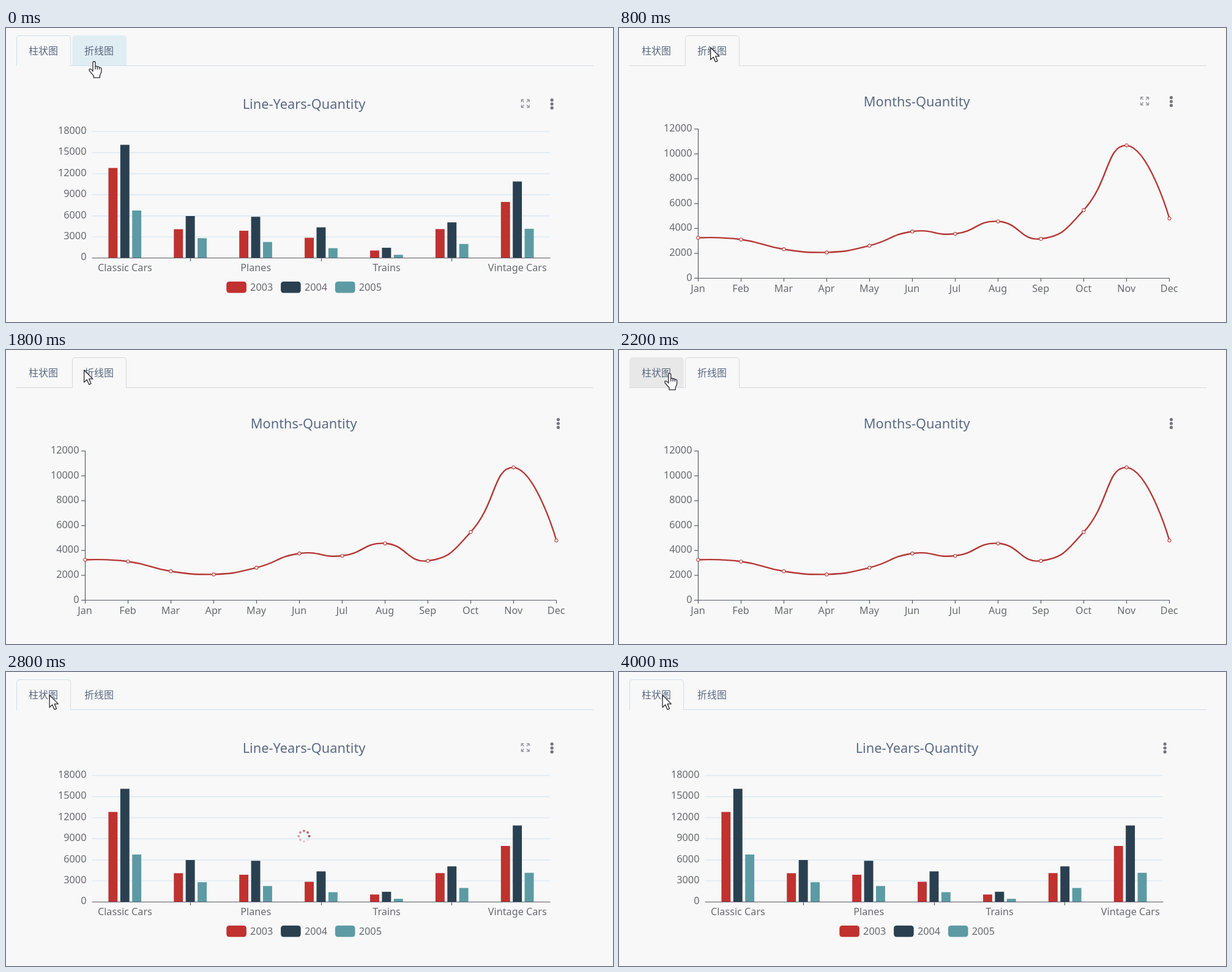
Animation, 992 px wide and 480 px high, one loop 4.2 s. Source, as an HTML page with a canvas:

```html
<!DOCTYPE html>
<html lang="zh">
<head>
<meta charset="utf-8">
<title>Chart tabs</title>
<style>
html, body { margin: 0; width: 100%; height: 100%; overflow: hidden; background: #f8f8f8; }
canvas { display: block; }
</style>
</head>
<body>
<canvas id="stage" width="992" height="480"></canvas>
<script>
const ctx = document.getElementById('stage').getContext('2d');
const LOOP = 4200, STEP = 200;
const BG = '#f8f8f8', TEXT = '#686a70', AXIS = '#5a5d6b', TITLE = '#5a6a85';
const LATIN = '"Noto Sans", "Open Sans", sans-serif';
const CJK = '"Noto Sans CJK SC", "Noto Sans CJK", sans-serif';

const SERIES = [
  { name: '2003', color: '#c0312f', tops: [228.5, 328.5, 331, 342.5, 363.3, 328.3, 284] },
  { name: '2004', color: '#2a4051', tops: [190.7, 307, 308.2, 325.5, 358.8, 317.3, 250.6] },
  { name: '2005', color: '#5c9ba4', tops: [298, 343.2, 349.4, 359.5, 370.3, 352.6, 327.8] }
];
const CATEGORIES = ['Classic Cars', '', 'Planes', '', 'Trains', '', 'Vintage Cars'];
const MONTHS = 'Jan Feb Mar Apr May Jun Jul Aug Sep Oct Nov Dec'.split(' ');
const POINTS = [342.5, 345.3, 361.2, 366.4, 355.4, 332.2, 336, 315.8, 344.2, 297.2, 191.6, 311]
  .map((y, i) => ({ x: 129.3 + i * 70.02, y }));

// Cursor keys: time, shape, x, y. A change of shape is a hard cut.
const CURSOR = [
  [0, 'hand', 135, 54], [600, 'hand', 143.5, 32],
  [800, 'arrow', 149, 31], [1200, 'arrow', 149, 31], [1800, 'arrow', 127, 32],
  [2000, 'hand', 78, 37], [2600, 'hand', 65.5, 39],
  [2800, 'arrow', 70.5, 37]
];
const SHAPES = {
  arrow: new Path2D('M.5 .6V16.8L4.2 13.2L7 19.6L9.7 18.5L7 12.2H12Z'),
  hand: new Path2D('M5.5 13V2Q5.5 .6 7 .6Q8.6 .6 8.6 2V7Q10.2 6 11.3 7.4Q12.9 6.7 13.8 8.2' +
    'Q16.4 7.9 16.4 10V14L14.5 18.5V21.4H6.5V19L1 12.5Q.2 10.2 2 10.2Q3.4 10.2 5.5 13Z'),
  knuckles: new Path2D('M8.6 7V10.8M11.3 7.4V10.8M13.8 8.2V10.8')
};

function text(str, x, y, size, color, align = 'center', family = LATIN) {
  ctx.font = `${size}px ${family}`;
  ctx.textAlign = align;
  ctx.fillStyle = color;
  ctx.fillText(str, x, y);
}

function line(x1, y1, x2, y2, color, width = 1) {
  ctx.beginPath();
  ctx.moveTo(x1, y1);
  ctx.lineTo(x2, y2);
  ctx.strokeStyle = color;
  ctx.lineWidth = width;
  ctx.stroke();
}

function dot(x, y, r, color) {
  ctx.beginPath();
  ctx.arc(x, y, r, 0, Math.PI * 2);
  ctx.fillStyle = color;
  ctx.fill();
}

function box(x, y, w, h, radius, color) {
  ctx.beginPath();
  ctx.roundRect(x, y, w, h, radius);
  ctx.fillStyle = color;
  ctx.fill();
}

function drawTabs(active, hover, hoverColor) {
  const left = [17, 108.5];
  const border = active ? '#d8d8d9' : '#cbdfea';
  if (hover >= 0) box(left[hover], 12, 88.5, 50, [5, 5, 0, 0], hoverColor);
  line(16.5, 61.5, 960, 61.5, border);
  const x = left[active] + (active ? 0 : 0.5);
  ctx.beginPath();
  ctx.roundRect(x, 12.5, 88, 54, [5, 5, 0, 0]);
  ctx.save();
  ctx.clip();
  ctx.fillStyle = BG;
  ctx.fillRect(x, 12, 88, 51);
  ctx.restore();
  ctx.beginPath();
  ctx.moveTo(x, 62);
  ctx.lineTo(x, 17);
  ctx.arcTo(x, 12.5, x + 5, 12.5, 4.5);
  ctx.arcTo(x + 88, 12.5, x + 88, 17, 4.5);
  ctx.lineTo(x + 88, 62);
  ctx.strokeStyle = border;
  ctx.lineWidth = 1;
  ctx.stroke();
  text('柱状图', 61, 43, 16, '#596880', 'center', CJK);
  text('折线图', 152, 43, 16, '#596880', 'center', CJK);
}

function drawTools(x, y, expand) {
  for (const dy of [-6.4, 0, 6.4]) dot(x, y + dy, 2.6, '#77747f');
  if (!expand) return;
  const cx = x - 43.5, cy = y - 0.7;
  for (const sx of [-1, 1]) for (const sy of [-1, 1]) {
    const px = cx + sx * 6.4, py = cy + sy * 6.4;
    line(cx + sx * 2.2, cy + sy * 2.2, px, py, '#8b8b95', 1.3);
    line(px, py, px - sx * 4.2, py, '#8b8b95', 1.3);
    line(px, py, px, py - sy * 4.2, '#8b8b95', 1.3);
  }
}

function drawBars() {
  const base = 375.5, gap = 34.4;
  text('Line-Years-Quantity', 487, 132.3, 21.8, TITLE);
  for (let i = 0; i <= 6; i++) {
    const y = base - i * gap;
    if (i) line(140.5, y, 889, y, '#dae8f1', 1.4);
    text(String(i * 3000), 131.5, y + 3.8, 16.3, TEXT, 'right');
  }
  SERIES.forEach((s, k) => s.tops.forEach((top, i) => {
    ctx.fillStyle = s.color;
    ctx.fillRect(167.4 + i * 106.9 + k * 19.4, top, 14.9, base - top);
  }));
  line(140.5, base, 889.5, base, AXIS, 1.2);
  CATEGORIES.forEach((name, i) => {
    const x = 194.4 + i * 106.9;
    if (name) text(name, x, 397.2, 16.2, TEXT);
    else line(Math.floor(x) + 0.5, base, Math.floor(x) + 0.5, 381, AXIS, 1.2);
  });
  SERIES.forEach((s, k) => {
    const x = 360.3 + k * 88.8;
    box(x, 414, 32.6, 18.6, 4.5, s.color);
    text(s.name, x + 38.8, 428.5, 16.3, TEXT, 'left');
  });
}

// Each control point follows the chord between the neighbours, kept inside the data range.
function traceCurve() {
  const clamp = y => Math.min(366.4, Math.max(191.6, y));
  let out = POINTS[0];
  ctx.beginPath();
  ctx.moveTo(out.x, out.y);
  for (let i = 1; i < POINTS.length; i++) {
    const p = POINTS[i], prev = POINTS[i - 1], next = POINTS[i + 1];
    let into = p, after = p;
    if (next) {
      const a = Math.hypot(p.x - prev.x, p.y - prev.y);
      const b = Math.hypot(next.x - p.x, next.y - p.y);
      const vx = (next.x - prev.x) / 2, vy = (next.y - prev.y) / 2;
      const r = b / (a + b);
      into = { x: p.x - vx * (1 - r), y: clamp(p.y - vy * (1 - r)) };
      after = { x: p.x + vx * r, y: clamp(p.y + vy * r) };
    }
    ctx.bezierCurveTo(out.x, out.y, into.x, into.y, p.x, p.y);
    out = after;
  }
}

function drawMonths() {
  const base = 408.5;
  text('Months-Quantity', 486.7, 128.3, 21.8, TITLE);
  for (let i = 0; i <= 6; i++) {
    const y = base - i * 40.6;
    line(123, y, 129.5, y, AXIS, 1.2);
    text(String(i * 2000), 119.5, y + 4, 16.3, TEXT, 'right');
  }
  line(129.5, 164.5, 129.5, base, AXIS, 1.2);
  line(129, base, 900, base, AXIS, 1.2);
  POINTS.forEach((p, i) => {
    const x = Math.floor(p.x) + 0.5;
    line(x, base, x, base + 5.5, AXIS, 1.2);
    text(MONTHS[i], p.x - 0.3, 431.2, 16.2, TEXT);
  });
  traceCurve();
  ctx.strokeStyle = '#b53634';
  ctx.lineWidth = 2.4;
  ctx.stroke();
  for (const p of POINTS) {
    dot(p.x, p.y, 3.1, '#bd4542');
    dot(p.x, p.y, 2, '#fff');
  }
}

function drawSpinner() {
  for (let i = 0; i < 8; i++) {
    const a = -i * Math.PI / 4;
    ctx.globalAlpha = 0.9 - i * 0.11;
    dot(487 + 8.6 * Math.cos(a), 268 + 8.6 * Math.sin(a), 2, '#a03c4b');
  }
  ctx.globalAlpha = 1;
}

function drawCursor(t) {
  let i = CURSOR.length - 1;
  while (CURSOR[i][0] > t) i--;
  const [t0, shape, x0, y0] = CURSOR[i];
  const next = CURSOR[i + 1];
  let x = x0, y = y0;
  if (next && next[1] === shape) {
    const k = (t - t0) / (next[0] - t0);
    x += (next[2] - x0) * k;
    y += (next[3] - y0) * k;
  }
  const scale = shape === 'hand' ? 1.27 : 1.24;
  ctx.save();
  ctx.translate(x, y);
  ctx.scale(scale, scale);
  ctx.lineJoin = 'round';
  ctx.fillStyle = '#fff';
  ctx.strokeStyle = '#2c2c34';
  ctx.lineWidth = 1.05;
  ctx.fill(SHAPES[shape]);
  ctx.stroke(SHAPES[shape]);
  if (shape === 'hand') ctx.stroke(SHAPES.knuckles);
  ctx.restore();
}

function draw(t) {
  const months = t >= 800 && t < 2800;
  ctx.fillStyle = BG;
  ctx.fillRect(0, 0, 992, 480);
  if (t < 800) drawTabs(0, 1, t < 600 ? '#e0edf3' : '#e5eaf1');
  else if (months) drawTabs(1, t >= 2000 ? 0 : -1, '#e8e8e8');
  else drawTabs(0, -1);
  if (months) {
    drawMonths();
    drawTools(902.5, 120, t < 1200);
  } else {
    drawBars();
    drawTools(892.2, 124, t < 3200);
  }
  if (t >= 2800 && t < 3000) drawSpinner();
  drawCursor(t);
}

function tick() {
  draw(Math.floor(performance.now() % LOOP / STEP) * STEP);
  requestAnimationFrame(tick);
}
tick();
</script>
</body>
</html>
```
